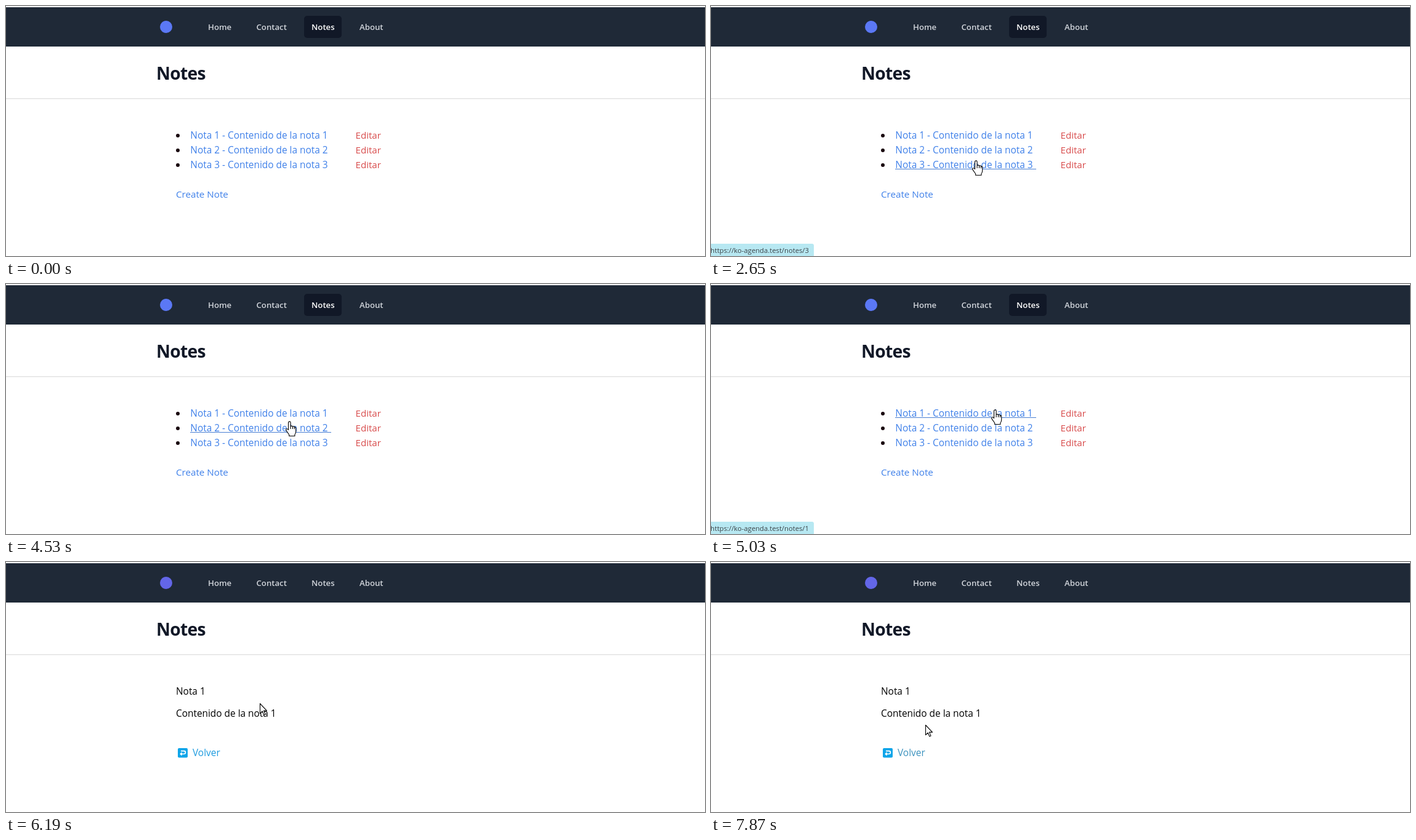
Animation of 1135x407 px, one loop 8000 ms. Source, as an HTML page:

```html
<!DOCTYPE html>
<html lang="es">
<head>
<meta charset="utf-8">
<title>Notes</title>
<style>
  html, body { margin: 0; width: 100%; height: 100%; overflow: hidden; background: #fff; }
  svg { display: block; width: 1135px; height: 407px; font: 15.4px "Open Sans", "Noto Sans", sans-serif; }
  .nav { font-size: 13.2px; font-weight: 600; fill: #d1d5db; }
  .title { font-size: 28.2px; font-weight: 700; letter-spacing: -.7px; fill: #111827; }
  .link { fill: #3f80e9; }
  .edit { font-size: 15.1px; fill: #d84c4c; }
  .status { font-size: 11.25px; fill: #3c4348; }
  #cursor path { fill: #fff; stroke: #000; stroke-width: 1.1; stroke-linejoin: round; }
</style>
</head>
<body>
<svg viewBox="0 0 1135 407">
  <rect y="2" width="1135" height="64" fill="#1f2937"/>
  <rect y="150" width="1135" height="1" fill="#e2e2e2"/>
  <rect y="151" width="1135" height="1" fill="#f1f1f1"/>
  <circle id="logo" cx="260" cy="34" r="10"/>
  <rect id="tab" x="484" y="16" width="61" height="36" rx="5" fill="#111827"/>
  <g class="nav">
    <text x="328" y="39">Home</text>
    <text x="406.5" y="39">Contact</text>
    <text x="496" y="39" id="tabText">Notes</text>
    <text x="574" y="39">About</text>
  </g>
  <text class="title" x="244" y="120">Notes</text>

  <g id="list">
    <g id="rows"></g>
    <rect id="underline" x="299" width="229" height="1" fill="#4a7fd2"/>
    <text class="link" x="276" y="312" font-size="15.2">Create Note</text>
  </g>

  <g id="detail">
    <text x="276" y="216">Nota 1</text>
    <text x="276" y="252">Contenido de la nota 1</text>
    <rect x="279" y="303" width="16" height="15.5" rx="2" fill="#0ea5e9"/>
    <path d="M283.5 312.5H289a2.4 2.4 0 0 0 0-4.8H284M285.6 310.3L283.4 312.5L285.6 314.7" fill="none" stroke="#fff" stroke-width="1.7"/>
    <text id="back" x="303" y="316">Volver</text>
  </g>

  <g id="status">
    <path id="bubble" fill="#b7e8f2"/>
    <text class="status" id="url" x="-1" y="402"></text>
  </g>

  <g id="cursor">
    <path id="arrow" d="M.5 .5V16.6L4.2 13L6.7 18.9L9 17.9L6.5 12.1H11.5Z"/>
    <path id="hand" d="M-2.5 13.5V1.7a1.8 1.8 0 0 1 3.6 0V7.6q2.6-1.2 3.4 .6q2.2-1.1 2.9 .7q2.3-.3 2.3 2.1V16q0 3-1.8 5v2.5H-1.3V21.3L-6 14.6q-.9-2.4 .9-2.8q1.2-.1 2.6 1.7ZM1.1 7.6V12M4.5 8.2V12M7.4 8.9V12.3"/>
  </g>
</svg>
<script>
const $ = id => document.getElementById(id);
const show = (id, on) => { $(id).style.display = on ? '' : 'none'; };

$('rows').innerHTML = [1, 2, 3].map(i => {
  const y = 192 + 24 * i;
  return `<circle cx="279" cy="${y - 5}" r="3" fill="#1a0a10"/>
    <text class="link" x="299.3" y="${y}">Nota ${i} - Contenido de la nota ${i}</text>
    <text class="edit" x="567.5" y="${y}">Editar</text>`;
}).join('');

const STEP = 167.5; // the picture advances in steps of this many ms
const MOVE = 3;     // the pointer rests, then travels for at most this many steps

// Pointer stops: step of arrival, x, y
const stops = [
  [1, 609, 184], [6, 426, 209], [9, 429, 257], [14, 431, 234], [16, 431, 252],
  [19, 437, 204], [24, 520, 100], [27, 461, 224], [28, 462, 205], [36, 412, 230],
  [41, 320, 307], [46, 359, 245], [47, 348, 265]
];

function pointer(step) {
  const i = Math.max(1, stops.findIndex(s => s[0] >= step));
  const [from, x0, y0] = stops[i - 1], [to, x1, y1] = stops[i];
  const begin = Math.max(from, to - MOVE);
  const k = Math.max(0, (step - begin) / (to - begin));
  return [x0 + (x1 - x0) * k, y0 + (y1 - y0) * k].map(Math.round);
}

function render(t) {
  const step = Math.floor(t / STEP + .2);
  const [x, y] = pointer(step);
  const opened = step >= 32;
  const loading = step === 32 || step === 33;
  const row = Math.floor((y - 199) / 24);
  const onNote = !opened && step > 0 && x >= 299 && x <= 528 && row >= 0 && row < 3;
  const onBack = opened && x >= 279 && x <= 346 && y >= 299 && y <= 322;

  show('list', !opened);
  show('detail', opened);
  show('tab', !opened);
  show('logo', !loading);
  show('underline', onNote);
  $('underline').setAttribute('y', 217 + 24 * row);
  $('logo').style.fill = opened ? '#6366e8' : '#5b78f5';
  $('tabText').style.fill = opened ? '' : '#fff';
  $('back').style.fill = step >= 41 ? '#3c92be' : '#1d9bdf';

  // The address bubble comes back late after the pointer has left the list
  const noteUrl = loading || onNote && (step < 22 || step > 28);
  show('status', noteUrl || onBack);
  $('url').textContent = 'https://ko-agenda.test/notes' + (noteUrl ? '/' + (row + 1) : '');
  $('bubble').setAttribute('d', `M0 387H${onBack ? 153 : 164}q3 0 3 3V407H0Z`);

  show('cursor', step > 0);
  show('hand', onNote || onBack);
  show('arrow', !onNote && !onBack);
  $('cursor').setAttribute('transform', `translate(${x} ${y})`);
}

const start = performance.now();
function tick() {
  render((performance.now() - start) % 8000);
  requestAnimationFrame(tick);
}
tick();
</script>
</body>
</html>
```
